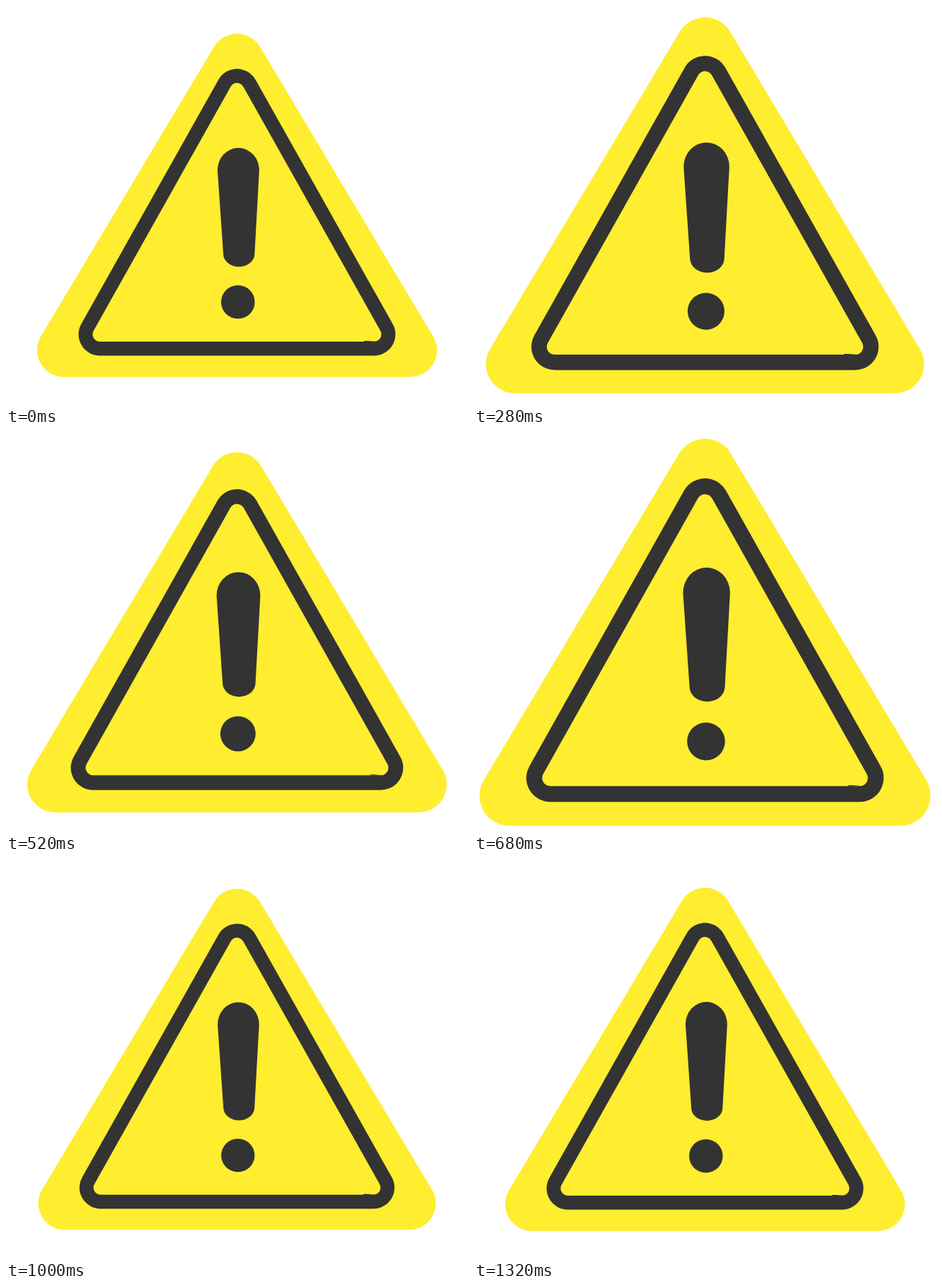
Animation of 640 by 554 pixels, one loop 1360 ms. Source, as an HTML page:

```html
<!DOCTYPE html>
<html lang="en">
<head>
<meta charset="utf-8">
<title>Pulsing warning sign</title>
<style>
  html, body { margin: 0; height: 100%; overflow: hidden; background: #fff; }
  svg { display: block; width: 640px; height: 554px; }
  .yellow { fill: #ffed2f; stroke: #ffed2f; }
  .ring { fill: #333; stroke: #333; }
  .mark { fill: #333; }
</style>
</head>
<body>
<svg viewBox="0 0 640 554" stroke-linejoin="round">
  <g id="sign">
    <path class="yellow" stroke-width="74" d="M80 478H560L320 75.5Z"/>
    <path class="ring" stroke-width="59" d="M130 456H510L320 116.8Z"/>
    <path class="yellow" stroke-width="20" d="M130 456H510L320 116.8Z"/>
    <path class="mark" d="M496 465h5l14 1.2h-19z"/>
    <path class="mark" d="M293 228A28.9 31 0 0 1 350.8 228L344.4 344A21.7 18 0 0 1 301 344Z"/>
    <circle class="mark" cx="321.3" cy="411" r="23.3"/>
  </g>
</svg>
<script>
  const LOOP = 1360, STEP = 40;
  const REST = 0.993, PEAK = 1.132;
  // Two heartbeats, then a slow return: [time in ms, scale]
  const keys = [[0, 1], [210, PEAK], [415, REST], [655, PEAK], [880, REST], [LOOP, 1]];
  const sign = document.getElementById('sign');

  const ease = p => (1 - Math.cos(Math.PI * p)) / 2;

  function scaleAt(t) {
    const i = keys.findIndex(([time]) => time > t);
    const [t0, s0] = keys[i - 1], [t1, s1] = keys[i];
    return s0 + (s1 - s0) * ease((t - t0) / (t1 - t0));
  }

  function draw(now) {
    const t = Math.floor((now % LOOP) / STEP) * STEP;
    sign.setAttribute('transform', `translate(320 276.7) scale(${scaleAt(t)}) translate(-320 -276.7)`);
  }

  let start;
  function tick(now) {
    start ??= now;
    draw(now - start);
    requestAnimationFrame(tick);
  }
  draw(0);
  requestAnimationFrame(tick);
</script>
</body>
</html>
```
